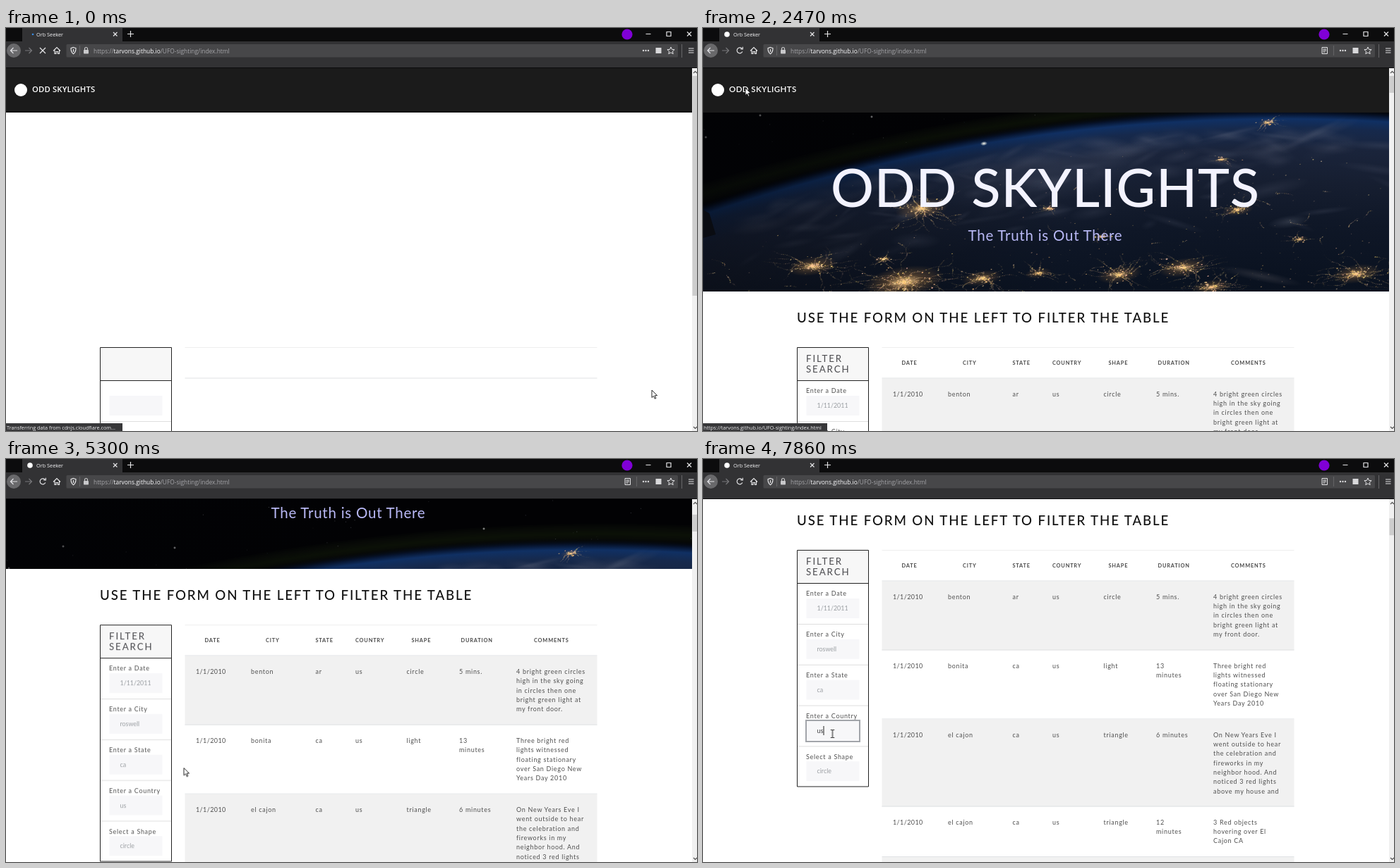
These frames come from a looping animation (979x572 px, 8 s). An HTML page with a canvas:

```html
<!DOCTYPE html>
<html lang="en">
<head>
<meta charset="utf-8">
<title>Orb Seeker</title>
<style>
html, body { margin: 0; width: 100%; height: 100%; overflow: hidden; background: #fff; }
canvas { position: absolute; left: 0; top: 57px; }
svg { position: absolute; left: 0; top: 0; }
text { font-family: Lato, "Open Sans", sans-serif; white-space: pre; }
.ui { font-family: "Open Sans", "Noto Sans", sans-serif; }
.line { fill: none; stroke: #e4e4e6; stroke-width: 1.2; }
.brand { font-size: 11.5px; font-weight: 600; letter-spacing: .4px; fill: #fff; }
.early { font-size: 11.3px; letter-spacing: .15px; }
.title { font-size: 76px; font-weight: 500; letter-spacing: .9px; fill: #f3f3ff; text-anchor: middle; }
.sub { font-size: 20.5px; letter-spacing: .75px; fill: #b9b9f6; text-anchor: middle; }
.lead { font-size: 18.7px; font-weight: 500; letter-spacing: 1.86px; fill: #111; }
.legend { font-size: 13.3px; letter-spacing: 1.9px; fill: #4c4c50; }
.head { font-size: 7.4px; font-weight: 700; letter-spacing: .8px; fill: #4a4a4a; }
.cell { font-size: 9px; letter-spacing: .7px; fill: #505050; }
.date { letter-spacing: .4px; }
.hint { font-size: 8.9px; fill: #9b9fa3; }
.typed { font-size: 8.9px; fill: #3c3c40; }

.move { animation: 8s linear infinite; }
#page, #thumb { animation-name: scroll; }
#page { --k: -108px; }
#thumb { --k: 5.4px; }
#title { animation-name: grow; }
#sub { animation-name: fade; }
#ring { animation-name: focus; }
#pointer { animation-name: point; }

@keyframes scroll {
  0%, 52.5% { transform: translateY(0); animation-timing-function: ease-in-out; }
  58.125% { transform: translateY(var(--k)); animation-timing-function: ease-in-out; }
  65.5% { transform: translateY(calc(2 * var(--k))); animation-timing-function: ease-in-out; }
  73.75%, 100% { transform: translateY(calc(3 * var(--k))); }
}
@keyframes grow {
  0%, 5.375% { opacity: 0; transform: scale(0); animation-timing-function: ease; }
  17.875%, 100% { opacity: 1; transform: scale(1); }
}
@keyframes fade {
  0%, 18.75% { opacity: 0; }
  30.6%, 100% { opacity: 1; }
}
@keyframes focus {
  0%, 83.3% { opacity: 0; }
  86.6%, 100% { opacity: 1; }
}
@keyframes point {
  0%, 10.875% { transform: translate(915px, 514px); }
  12.875% { transform: translate(911px, 502px); animation-timing-function: ease-in; }
  21.875% { transform: translate(570px, 290px); animation-timing-function: ease-out; }
  30.6%, 36.5% { transform: translate(60px, 85px); animation-timing-function: ease-in-out; }
  46.375%, 47.5% { transform: translate(238.5px, 377px); animation-timing-function: ease-in-out; }
  50.25%, 74.875% { transform: translate(252px, 438.5px); animation-timing-function: ease-in-out; }
  79.75%, 82.4% { transform: translate(183.5px, 387px); }
  83.6%, 100% { transform: translate(183.5px, 390px); }
}
</style>
</head>
<body>
<canvas id="photo" width="972" height="515"></canvas>
<svg width="979" height="572" viewBox="0 0 979 572">
  <g id="page" class="move">
    <rect y="57" width="972" height="63" fill="#1b1b1b"/>
    <rect y="118" width="972" height="2" fill="#101010" data-show="0-160"/>
    <circle cx="21" cy="88" r="9" fill="#fff"/>
    <text class="brand early ui" x="37" y="91.2" data-show="0-160">ODD SKYLIGHTS</text>
    <text class="brand" x="37" y="91.2" data-show="160-8000">ODD SKYLIGHTS</text>
    <rect y="120" width="972" height="254" fill="#fff" data-show="0-160"/>
    <g transform="translate(485 181)"><text id="title" class="move title" y="73">ODD SKYLIGHTS</text></g>
    <text id="sub" class="move sub" x="485" y="302.3">The Truth is Out There</text>
    <rect y="374" width="972" height="700" fill="#fff"/>
    <text class="lead" x="133" y="417.7" data-show="160-8000">USE THE FORM ON THE LEFT TO FILTER THE TABLE</text>
    <g id="form"></g>
    <g id="table"></g>
  </g>

  <g id="bar">
    <rect x="972" y="57" width="7" height="515" fill="#f0f0f0"/>
    <rect x="972.5" y="68" width="6.5" height="312" fill="#cdcdcd" data-show="0-160"/>
    <g data-show="160-8000"><rect id="thumb" class="move" x="972.5" y="68" width="6.5" height="24" fill="#cdcdcd"/></g>
    <path d="M974 64l2.5-2.5 2.5 2.5M974 566l2.5 2.5 2.5-2.5" fill="none" stroke="#505050" stroke-width="1.2"/>
  </g>

  <g id="chrome">
    <rect width="979" height="57" fill="#0c0c0d"/>
    <rect y="19" width="979" height="37" fill="#323234"/>
    <rect x="23" width="142" height="19" fill="#323234"/>
    <circle cx="38" cy="9" r="1.3" fill="#3a8ee6" data-show="0-800"/>
    <circle cx="34" cy="9" r="3.8" fill="#fff" data-show="800-8000"/>
    <text class="ui" x="43" y="11.8" font-size="7.3" fill="#f5f5f7">Orb Seeker</text>
    <path class="line" d="M152 6l5.5 5.5m0-5.500l-5.500 5.500M172 8.500h9m-4.500-4.500v9M906.500 8.500h7M936 5.500h6v6h-6zM965 5.500l6 6m0-6l-6 6"/>
    <circle cx="880" cy="9" r="7.6" fill="#8000d7"/>

    <circle cx="11" cy="32" r="10" fill="#69696b"/>
    <path class="line" d="M16 32H6.5m4-4l-4 4 4 4"/>
    <path class="line" style="stroke:#77777a" d="M27 32h9.5m-4-4l4 4-4 4"/>
    <path class="line" d="M48 28l8 8m0-8l-8 8" data-show="0-800"/>
    <path class="line" style="stroke:#77777a" d="M55.8 33.5a4 4 0 1 1-.8-4.5m1.3-2.2v3h-3" data-show="800-1350"/>
    <path class="line" d="M55.8 33.5a4 4 0 1 1-.8-4.5m1.3-2.2v3h-3" data-show="1350-8000"/>
    <path class="line" d="M67 32.5l5-5 5 5M69 31.5v5h2v-3h2.5v3h2v-5"/>
    <rect x="85.5" y="23" width="866.5" height="18.5" rx="1.5" fill="#474749"/>
    <path class="line" d="M95.5 27.5l3.5 1.2c0 4-1 6.3-3.5 8-2.5-1.7-3.5-4-3.5-8zM95.5 30v4"/>
    <path class="line" style="stroke:#626264" d="M104.5 25v14M957.5 23v19"/>
    <rect x="110" y="31" width="7" height="5.5" rx=".8" fill="#c9c9cb"/>
    <path class="line" style="stroke:#c9c9cb" d="M111.5 31v-1.5a2 2 0 0 1 4 0V31"/>
    <text class="ui" x="124" y="35.5" font-size="8.38" fill="#a4a4a8">https://<tspan fill="#fafafc">tarvons.github.io</tspan>/UFO-sighting/index.html</text>
    <g data-show="800-8000">
      <path class="line" style="stroke-width:1" d="M877 27.5h7.5v9H877zM878.5 30h4.5m-4.5 2h4.5m-4.5 2h3"/>
      <path class="line" style="stroke:#626264" d="M893.5 25v14"/>
    </g>
    <g fill="#d8d8da">
      <circle cx="903" cy="32" r="1.2"/><circle cx="906.5" cy="32" r="1.2"/><circle cx="910" cy="32" r="1.2"/>
      <rect x="920.5" y="28" width="8" height="8"/>
    </g>
    <path class="line" style="stroke-width:1" d="M942 27l1.5 3.4 3.6.3-2.7 2.4.8 3.6-3.2-1.9-3.2 1.9.8-3.6-2.7-2.4 3.6-.3z"/>
    <path class="line" d="M967 29h7.5m-7.5 3h7.5m-7.5 3h7.5"/>
  </g>

  <g font-size="7.25" fill="#f0f0f2">
    <g data-show="0-800">
      <rect y="561" width="165" height="11" fill="#38383a"/>
      <text class="ui" x="1" y="570">Transferring data from cdnjs.cloudflare.com...</text>
    </g>
    <g data-show="2400-2980">
      <rect y="561" width="176" height="11" fill="#38383a"/>
      <text class="ui" x="1" y="570">https://tarvons.github.io/UFO-sighting/index.html</text>
    </g>
  </g>

  <g id="pointer" class="move">
    <path d="M0 0v10.5l2.5-2.2 1.7 3.9 1.7-.7-1.7-3.8h3.4z" fill="#fff" stroke="#111" stroke-width=".9" data-show="0-6200"/>
    <path d="M-2.5-5.5H-.8L0-4.8.8-5.5h1.7M0-4.8v9.6M-2.5 5.5H-.8L0 4.8.8 5.5h1.7" fill="none" stroke="#111" data-show="6200-8000"/>
  </g>
</svg>

<script>
const LOOP = 8000;
const byId = id => document.getElementById(id);
const text = (cls, x, y, s, extra = "") => `<text class="${cls}" x="${x}" y="${y}" ${extra}>${s}</text>`;
const rect = (x, y, w, h, fill) => `<rect x="${x}" y="${y}" width="${w}" height="${h}" fill="${fill}"/>`;
const loaded = s => `<g data-show="160-${LOOP}">${s}</g>`;

function buildForm() {
  const fields = [["Enter a Date", "1/11/2011"], ["Enter a City", "roswell"], ["Enter a State", "ca"],
    ["Enter a Country", "us"], ["Select a Shape", "circle"]];
  let boxes = rect(134, 454, 100, 46, "#f7f7f7");
  let labels = text("legend", 146, 473.7, "FILTER") + text("legend", 146, 489, "SEARCH");
  fields.forEach(([label, hint], i) => {
    const dy = i * 57.8;
    boxes += rect(146.5, 522 + dy, 75, 28, "#f7f7f9");
    if (i < 4) boxes += rect(134, 558 + dy, 100, 1, "#dedede");
    labels += text("cell", 146, 518.3 + dy, label);
    labels += text("hint", 161.5, 539.2 + dy, hint, i === 3 ? 'data-show="0-7630"' : "");
  });
  const y = 712.6;
  const caret = (x, show) => `<rect x="${x}" y="703" width="1" height="13" fill="#222" data-show="${show}"/>`;
  byId("form").innerHTML = boxes +
    '<path d="M133.5 453.5h101v335.5h-101zM133.5 500.5h101" fill="none" stroke="#222"/>' +
    loaded(labels) +
    '<rect id="ring" class="move" x="146" y="695" width="76" height="30" fill="none" stroke="#a2a5aa" stroke-width="2"/>' +
    text("typed", 161.5, y, "u", 'data-show="7630-8000"') +
    text("typed", 166.4, y, "s", 'data-show="7860-8000"') +
    caret(162, "6690-7310") + caret(166.5, "7630-7860") + caret(170.5, "7860-8000");
}

function buildTable() {
  const heads = { DATE: 281.5, CITY: 368, STATE: 438.5, COUNTRY: 495, SHAPE: 574.5, DURATION: 644.5, COMMENTS: 748 };
  const cols = [347, 438.5, 495, 567.5, 642, 723];
  const rows = [
    [98, "benton|ar|us|circle|5 mins.|4 bright green circles/high in the sky going/in circles then one/bright green light at/my front door."],
    [98, "bonita|ca|us|light|13/minutes|Three bright red/lights witnessed/floating stationary/over San Diego New/Years Day 2010"],
    [124, "el cajon|ca|us|triangle|6 minutes|On New Years Eve I/went outside to hear/the celebration and/fireworks in my/neighbor hood. And/noticed 3 red lights/above my house and"],
    [71.5, "el cajon|ca|us|triangle|12/minutes|3 Red objects/hovering over El/Cajon CA"],
    [98, ""]
  ];
  let y = 497.5, out = "";
  for (const name in heads) out += text("head", heads[name], 478.2, name);
  rows.forEach(([h, data], i) => {
    if (i % 2 === 0) out += rect(253.5, y, 584, h, "#f1f1f1");
    out += rect(253.5, y + h - 1, 584, 1, "#e0e2e4");
    if (data) {
      out += text("cell date", 269, y + 25.2, "1/1/2010");
      data.split("|").forEach((cell, c) => cell.split("/").forEach((s, n) =>
        out += text("cell", cols[c], y + 25.2 + n * 13.35, s)));
    }
    y += h;
  });
  byId("table").innerHTML = rect(253.5, 453, 584, 1, "#eee") + loaded(out) + rect(253.5, 496.5, 584, 1, "#dfe1e3");
}

function paintPhoto() {
  const c = byId("photo").getContext("2d");
  let seed = 11;
  const rnd = () => (seed = seed * 16807 % 2147483647) / 2147483647;
  const spread = () => rnd() + rnd() + rnd() - 1.5;
  const limb = x => 126 + (x - 820) ** 2 / 5080;
  const glow = (x, y, rx, ry, rgb, alpha, tilt = -.15) => {
    c.save();
    c.translate(x, y);
    c.rotate(tilt);
    c.scale(rx, ry);
    const g = c.createRadialGradient(0, 0, 0, 0, 0, 1);
    g.addColorStop(0, `rgba(${rgb},${alpha})`);
    g.addColorStop(1, `rgba(${rgb},0)`);
    c.fillStyle = g;
    c.fillRect(-1, -1, 2, 2);
    c.restore();
  };
  c.translate(0, -57);
  c.fillStyle = "#020204";
  c.fillRect(0, 57, 972, 515);

  // stars and the faint air glow
  for (let i = 0; i < 45; i++) {
    c.fillStyle = `rgba(200,205,220,${.1 + rnd() * .3})`;
    c.fillRect(rnd() * 972, 57 + rnd() * 130, 1, 1);
  }
  for (const [x, y] of [[239, 126], [81, 124], [677, 99], [4, 155]]) glow(x, y, 2, 2, "255,255,255", .8);
  for (let w = 4; w < 34; w += 5) {
    c.strokeStyle = "rgba(32,46,24,.08)";
    c.lineWidth = w;
    c.beginPath();
    c.arc(850, 2956, 2850, 0, 7);
    c.stroke();
  }

  // planet
  const R = 2540, cy = 126 + R, inner = R - 470, outer = R + 14;
  const g = c.createRadialGradient(820, cy, inner, 820, cy, outer);
  const stop = (depth, color) => g.addColorStop((R - depth - inner) / (outer - inner), color);
  stop(470, "#060b14");
  stop(230, "#0a1220");
  stop(150, "#0f1727");
  stop(95, "#161e30");
  stop(45, "#1a243b");
  stop(16, "#16294c");
  stop(3, "#103063");
  stop(-4, "#071530");
  stop(-14, "rgba(2,2,4,0)");
  c.fillStyle = g;
  c.beginPath();
  c.arc(820, cy, outer, 0, 7);
  c.fill();

  // clouds, densest just below the limb
  for (let i = 0; i < 130; i++) {
    const x = rnd() * 1000, y = limb(x) + 22 + rnd() * rnd() * 150;
    glow(x, y, 12 + rnd() * 50, 3 + rnd() * 9, "100,106,126", .05 + rnd() * .17, (x - 820) / R + spread() * .5);
  }
  glow(480, 205, 170, 45, "84,90,110", .3);
  glow(830, 275, 30, 9, "110,116,130", .3);
  glow(790, 352, 60, 8, "105,100,105", .3, .2);

  // night side fades towards the left
  const shade = c.createLinearGradient(0, 0, 520, 0);
  shade.addColorStop(0, "rgba(2,3,6,.5)");
  shade.addColorStop(1, "rgba(2,3,6,0)");
  c.fillStyle = shade;
  c.fillRect(0, 57, 520, 515);

  // city lights: a bright core with thin branching roads
  const speck = (x, y, r, a) => {
    c.fillStyle = `rgba(255,${185 + rnd() * 45 | 0},${105 + rnd() * 70 | 0},${a})`;
    c.beginPath();
    c.ellipse(x, y, r * 1.3, r * .8, -.3, 0, 7);
    c.fill();
  };
  const road = (x, y, length) => {
    let angle = rnd() * 7;
    for (let i = 0; i < length; i++) {
      angle += spread() * .5;
      x += Math.cos(angle) * 2.6;
      y += Math.sin(angle) * 1.3;
      speck(x, y, .35 + rnd() * .6, (.2 + rnd() * .6) * (1 - i / length));
    }
  };
  const cities = [[310, 256, 24], [285, 360, 36], [155, 338, 22], [395, 355, 18], [590, 350, 20], [680, 340, 22],
    [758, 258, 14], [565, 296, 7], [925, 349, 22], [475, 348, 12], [735, 187, 7], [720, 368, 18],
    [490, 256, 8], [845, 300, 8], [255, 328, 8], [800, 134, 9]];
  for (const [x, y, r] of cities) {
    glow(x, y, r * 1.6, r * .6, "225,155,75", .2 + r * .008);
    glow(x, y, r * .7, r * .25, "255,215,150", .25 + r * .012);
    for (let i = 0; i < r * 4; i++) {
      const far = rnd();
      speck(x + spread() * r * 1.8 * far, y + spread() * r * .7 * far, .35 + rnd() * .8, .3 + rnd() * .6);
    }
    for (let i = 0; i < r * .6; i++) road(x, y, r * 1.3);
  }
  for (let i = 0; i < 70; i++) {
    const x = rnd() * 972;
    road(x, limb(x) + 50 + Math.sqrt(rnd()) * 220, 4 + rnd() * 12);
  }
  for (let i = 0; i < 420; i++) {
    const x = rnd() * 972;
    speck(x, limb(x) + 24 + Math.sqrt(rnd()) * 250, .3 + rnd() * .6, .1 + rnd() * .5);
  }
  glow(398, 164, 5, 3, "255,255,240", 1);
  c.fillStyle = "#0a0c12";
  c.beginPath();
  c.moveTo(0, 258);
  c.lineTo(9, 263);
  c.lineTo(18, 293);
  c.lineTo(0, 298);
  c.fill();
}

// data-show="from-to": visible only within that span of the loop, in ms
function schedule(el) {
  const [from, to] = el.dataset.show.split("-").map(Number);
  const key = (opacity, ms) => ({ opacity, offset: ms / LOOP, easing: "step-end" });
  const frames = [key(from ? 0 : 1, 0)];
  if (from) frames.push(key(1, from));
  if (to < LOOP) frames.push(key(0, to));
  frames.push(key(to < LOOP ? 0 : 1, LOOP));
  el.animate(frames, { duration: LOOP, iterations: Infinity });
}

buildForm();
buildTable();
paintPhoto();
document.querySelectorAll("[data-show]").forEach(schedule);
</script>
</body>
</html>
```
